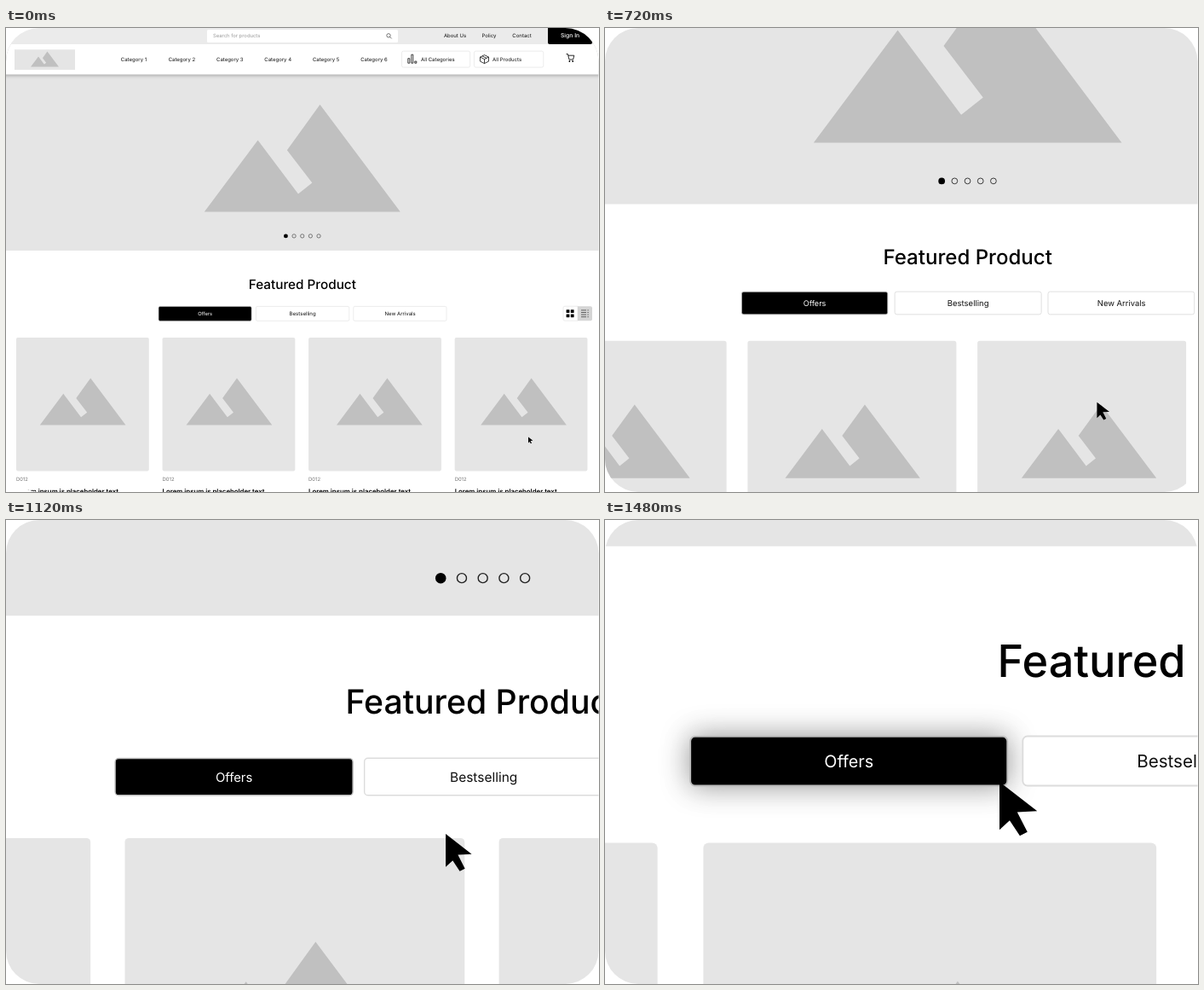
An HTML page with a canvas that plays this animation: 696x544 px, repeating every 1520 ms.

```html
<!DOCTYPE html>
<html lang="en">
<head>
<meta charset="utf-8">
<title>Shop page zoom</title>
<style>
  html, body { margin: 0; width: 100%; height: 100%; overflow: hidden; background: #fff; }
  canvas { display: block; }
</style>
</head>
<body>
<canvas id="stage" width="696" height="544"></canvas>
<script>
const ctx = document.getElementById('stage').getContext('2d');
const LOOP = 1520, STEP = 40, START = 488, STEPS = 24.45;
const FOCUS = { x: 211.8, y: 356.6 }, GROWTH = 0.0987;
const GREY = '#e5e5e5', DARK = '#c0c0c0', LINE = '#dcdcdc';

const MOUNTAIN = [[0, 0], [.273, -.365], [.479, -.091], [.55, -.147], [.422, -.314], [.59, -.546], [1, 0]];
const POINTER = [[0, 0], [0, 1.27], [.27, 1.02], [.54, 1.43], [.74, 1.33], [.47, .8], [1, .775]];

function box(x, y, w, h, r, fill, stroke) {
  ctx.beginPath();
  ctx.roundRect(x, y, w, h, r);
  if (fill) { ctx.fillStyle = fill; ctx.fill(); }
  if (stroke) { ctx.strokeStyle = stroke; ctx.lineWidth = .55; ctx.stroke(); }
}

function shape(points, x, y, size, fill) {
  ctx.beginPath();
  for (const [px, py] of points) ctx.lineTo(x + px * size, y + py * size);
  ctx.closePath();
  ctx.fillStyle = fill;
  ctx.fill();
}

function circle(x, y, r, fill, width = .55) {
  ctx.beginPath();
  ctx.arc(x, y, r, 0, 7);
  ctx.fillStyle = '#000';
  ctx.strokeStyle = '#222';
  ctx.lineWidth = width;
  fill ? ctx.fill() : ctx.stroke();
}

function icon(path, x, y, width = .8, color = '#111') {
  ctx.save();
  ctx.translate(x, y);
  ctx.strokeStyle = color;
  ctx.lineWidth = width;
  ctx.stroke(new Path2D(path));
  ctx.restore();
}

function label(text, x, y, size = 6, color = '#111', align = 'center', weight = 400) {
  ctx.font = `${weight} ${size}px Inter, sans-serif`;
  ctx.textAlign = align;
  ctx.fillStyle = color;
  ctx.fillText(text, x, y);
}

function withShadow(color, blur, offsetY, draw) {
  ctx.save();
  ctx.shadowColor = color;
  ctx.shadowBlur = blur;
  ctx.shadowOffsetY = offsetY;
  draw();
  ctx.restore();
}

function banner() {
  box(-5, 50, 710, 211.1, 0, GREY);
  shape(MOUNTAIN, 232.8, 215.4, 230, DARK);
  for (let i = 0; i < 5; i++) circle(328.4 + i * 9.66, 243.9, i ? 2.15 : 2.45, !i);
}

function header(scale) {
  withShadow('#0004', 4 * scale, scale, () => box(-5, 10, 710, 44.5, 0, '#fff'));
  box(-5, -5, 710, 24, 0, '#ebebeb');
  box(236, 2, 224, 15, 1.5, '#fff');
  label('Search for products', 243, 11.2, 5.9, '#999', 'left');
  circle(449, 8.8, 2.2, false, .6);
  icon('M1.6 1.6L3.6 3.6', 449, 8.8, .6);
  label('About Us', 527, 11.2);
  label('Policy', 567, 11.2);
  label('Contact', 605.5, 11.2);
  box(636, -3, 52, 22, 2, '#000');
  label('Sign In', 662, 11.4, 6.8, '#fff', 'center', 500);

  box(10, 25.2, 71, 23.8, 0, GREY);
  shape(MOUNTAIN, 29, 45.5, 33, DARK);
  for (let i = 0; i < 6; i++) label('Category ' + (i + 1), 150 + i * 56.4, 38.8, 6);

  box(464.5, 27.1, 80.2, 19, 2, '#fff', LINE);
  icon('M0 4.5h2v5.5h-2zM4 0h2v10h-2zM8 7.8h2v2.2h-2z', 471.8, 31.2);
  label('All Categories', 487, 38.6, 6, '#111', 'left');
  box(549.4, 27.1, 81.4, 19, 2, '#fff', LINE);
  icon('M0-5L5-2.5V2.5L0 5L-5 2.5V-2.5ZM-5-2.5L0 0L5-2.5M0 0V5M-2.5-3.7L2.5-1.2', 561.5, 36.6);
  label('All Products', 571, 38.6, 6, '#111', 'left');
  icon('M0 0h1.8l1.6 6.5h4.6l1.2-4.8h-7', 657.6, 30.5, .9);
  circle(661.4, 39, .9, true);
  circle(665.2, 39, .9, true);
}

function tabs(hover, scale) {
  label('Featured Product', 347.8, 306, 15.3, '#000', 'center', 500);
  const offers = () => box(179.1, 326.5, 109, 16.9, 1.6, '#000', '#bbb');
  hover ? withShadow('#0006', 10 * scale, 0, offers) : offers();
  label('Offers', 233.6, 337.1, 5.8, '#fff');
  box(293.4, 326.4, 109.4, 17, 1.6, '#fff', LINE);
  label('Bestselling', 348.1, 337.1, 6.05);
  box(407.8, 326.4, 109.2, 17, 1.6, '#fff', LINE);
  label('New Arrivals', 462.6, 337.1, 6);

  box(654, 326.2, 17, 17, [2, 0, 0, 2], '#fff', LINE);
  box(671, 326.2, 17, 17, [0, 2, 2, 0], '#d5d5d5');
  for (const x of [657.6, 662.8]) for (const y of [330.2, 335.4]) box(x, y, 3.8, 3.8, .4, '#000');
  icon('M0 0h6M0 2.6h6M0 5.2h6M0 7.8h6M7.4 0h1.4M7.4 2.6h1.4M7.4 5.2h1.4M7.4 7.8h1.4', 675, 330.9, .9, '#555');
}

function cards() {
  [39.8, 211.6, 388, 557.2].forEach((peakX, i) => {
    const x = 12 + i * 171.55;
    box(x, 363, 155.8, 156.4, 1.8, GREY);
    shape(MOUNTAIN, peakX, 465.5, 100.7, DARK);
    label('D012', x, 530.6, 5.9, '#777', 'left');
    label('Lorem ipsum is placeholder text', x, 546, 7.8, '#000', 'left', 600);
  });
}

function draw(time) {
  const t = Math.floor(time / STEP) * STEP % LOOP;
  const k = Math.min(Math.max((t - START) / STEP, 0), STEPS);
  const scale = 1 + GROWTH * k;

  ctx.reset();
  ctx.textRendering = 'geometricPrecision';
  ctx.fillStyle = '#fff';
  ctx.fillRect(0, 0, 696, 544);
  ctx.beginPath();
  ctx.roundRect(0, 0, 695.5, 544, 39);
  ctx.clip();

  ctx.save();
  ctx.translate(FOCUS.x, FOCUS.y);
  ctx.scale(scale, scale);
  ctx.translate(-FOCUS.x, -FOCUS.y);
  banner();
  header(scale);
  tabs(k === STEPS, scale);
  cards();
  ctx.restore();

  shape(POINTER, 613 - 6.135 * k, 479.6 - 7.06 * k, 5.4 + 1.59 * k, '#000');
}

function tick() {
  draw(performance.now());
  requestAnimationFrame(tick);
}
tick();
</script>
</body>
</html>
```
